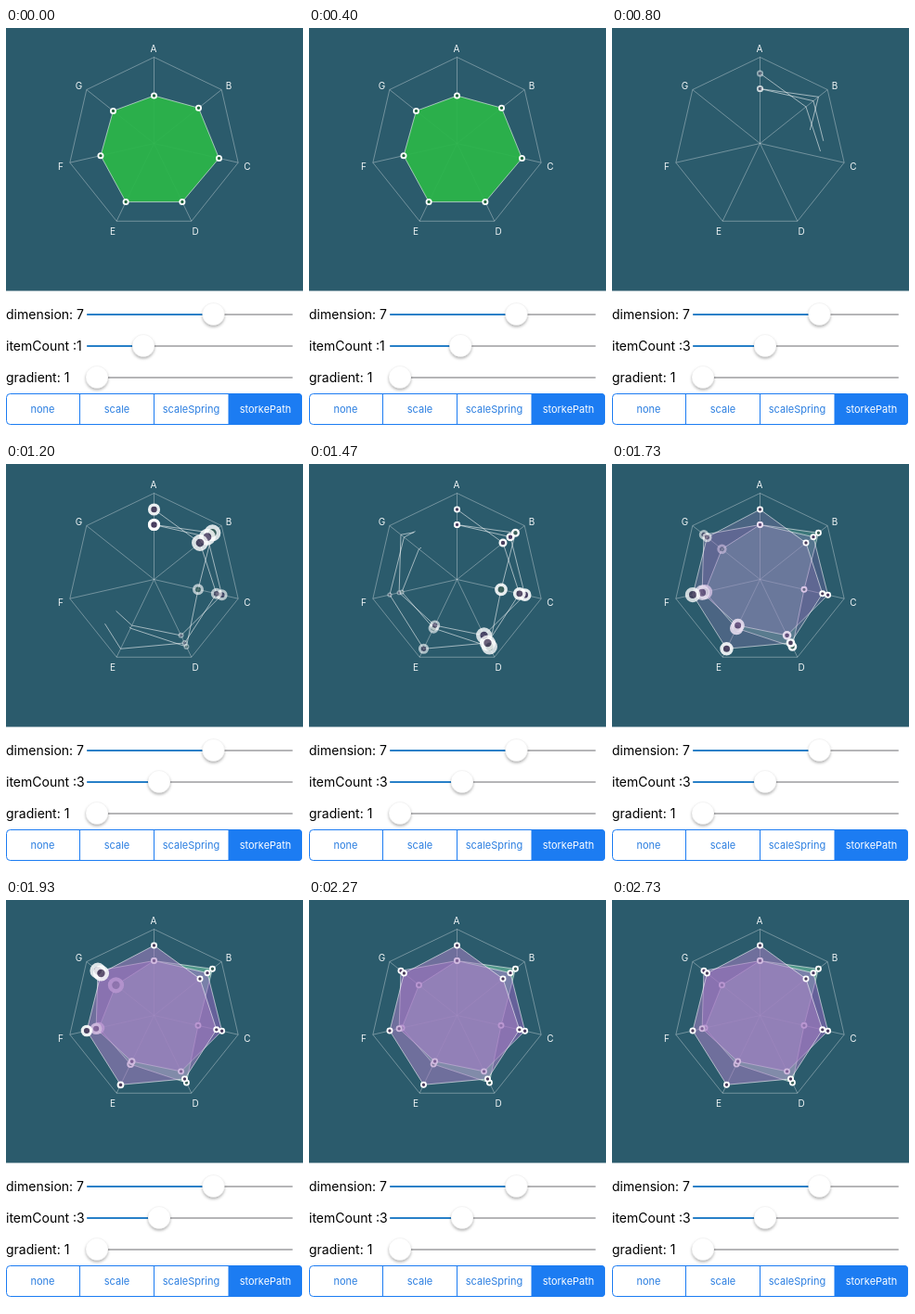
An HTML page that plays this animation: 320x440 px, repeating every 2790 ms.

```html
<!DOCTYPE html>
<html lang="en">
<head>
<meta charset="utf-8">
<title>Radar chart</title>
<style>
  html, body { margin: 0; width: 100%; height: 100%; overflow: hidden; background: #fff; }
  svg { display: block; width: 100vw; height: 100vh; font-family: Inter, Roboto, sans-serif; }
</style>
</head>
<body>
<svg id="stage" viewBox="0 0 320 440">
  <defs>
    <filter id="shadow" x="-50%" y="-50%" width="200%" height="220%">
      <feDropShadow dx="0" dy="2" stdDeviation="1.8" flood-color="#000" flood-opacity=".3"/>
    </filter>
  </defs>
</svg>
<script>
const LOOP = 2790, STEP = LOOP / 42;
const SWITCH = 530;                        // item count goes from 1 to 3
const DRAW_AT = 540, DRAW_MS = 1045;       // outline drawing
const FADE_AT = 1585, FADE_MS = 320;       // fill fading in
const PEAK_AT = 1057, PEAK_GAP = 1000 / 7; // dot pulses, one axis after another
const GROW_MS = 430, SHRINK_MS = 330;
const CX = 159.5, CY = 124.5, R = 93;
const BLUE = '#1c7cf2';
const stage = document.getElementById('stage');

const clamp = v => Math.max(0, Math.min(1, v));

function add(tag, attrs, parent = stage, text) {
  const el = document.createElementNS('http://www.w3.org/2000/svg', tag);
  set(el, attrs);
  if (text) el.textContent = text;
  return parent.appendChild(el);
}

function set(el, attrs) {
  for (const key in attrs) el.setAttribute(key, attrs[key]);
}

function polar(i, r) {
  const a = i * 2 * Math.PI / 7;
  return [CX + r * Math.sin(a), CY - r * Math.cos(a)];
}

const outline = radii => 'M' + radii.map((r, i) => polar(i, r).map(v => v.toFixed(2))).join('L') + 'Z';

function drawWeb() {
  add('rect', { width: 320, height: 283.5, fill: '#2b5b6c' });
  const web = add('g', { fill: 'none', stroke: '#fff', 'stroke-opacity': .42, 'stroke-width': .8 });
  add('path', { d: outline(Array(7).fill(R)) }, web);
  for (let i = 0; i < 7; i++) {
    const [x, y] = polar(i, R);
    add('path', { d: `M${CX} ${CY}L${x} ${y}` }, web);
  }
  const spots = [[159, 26], [240, 65.5], [260, 153], [204, 222.5], [115, 222.5], [59, 153], [78.5, 65.5]];
  spots.forEach(([x, y], i) => add('text',
    { x, y, fill: '#f2f6f7', 'font-size': 10, 'text-anchor': 'middle' }, stage, 'ABCDEFG'[i]));
}

function makeSeries(color, alpha, core, radii) {
  const g = add('g', {});
  const d = outline(radii);
  const fill = add('path', { d, fill: color, 'fill-opacity': alpha }, g);
  const line = add('path', {
    d, fill: 'none', stroke: '#fff', 'stroke-opacity': .7, 'stroke-width': .8,
    pathLength: 1, 'stroke-dasharray': '1 1'
  }, g);
  const dots = radii.map((r, i) => {
    const [cx, cy] = polar(i, r);
    return add('circle', { cx, cy, r: 2.6, fill: core, stroke: '#fff', 'stroke-width': 1.8 }, g);
  });
  return { g, fill, line, dots };
}

function makeSlider(y, label, x) {
  const text = add('text', { x: 0, y: y + 5.3, 'font-size': 14, fill: '#000' }, stage, label);
  add('rect', { x: 87, y: y - 1, width: 222, height: 2, rx: 1, fill: '#b5b5b7' });
  const bar = add('rect', { x: 87, y: y - 1, height: 2, rx: 1, fill: '#2880c8' });
  const knob = add('circle', { cy: y - .5, r: 12, fill: '#fff', stroke: '#000', 'stroke-opacity': .08,
    'stroke-width': .6, filter: 'url(#shadow)' });
  const move = px => { set(bar, { width: px - 87 }); set(knob, { cx: px }); };
  move(x);
  return { text, move };
}

function drawTabs() {
  add('rect', { x: .5, y: 394.5, width: 318, height: 33, rx: 4, fill: '#fff', stroke: BLUE });
  add('path', { d: 'M239.5 394H315a4 4 0 0 1 4 4V424a4 4 0 0 1 -4 4H239.5Z', fill: BLUE });
  add('path', { d: 'M79.5 394V428M159.5 394V428', stroke: BLUE });
  ['none', 'scale', 'scaleSpring', 'storkePath'].forEach((name, i) => add('text', {
    x: 39.5 + i * 80, y: 415, 'font-size': 11, 'text-anchor': 'middle', fill: i === 3 ? '#fff' : '#2b7ee0'
  }, stage, name));
}

drawWeb();
const single = makeSeries('#2bb54a', .94, '#22663f', [51.5, 61.4, 71.8, 70, 70, 59, 56.3]);
const trio = [
  makeSeries('#6ec3a0', .6, '#3b5f58', [59, 80.5, 48.7, 80.5, 58.4, 61, 52.5]),
  makeSeries('#a069c8', .5, '#493a60', [59, 73.5, 75, 67, 55, 64, 77.4]),
  makeSeries('#a880c3', .55, '#4a3d5c', [75.5, 63.3, 69, 76, 83, 74.4, 73])
];
makeSlider(309, 'dimension: 7', 223.5);
const count = makeSlider(343, 'itemCount :1', 148);
makeSlider(377, 'gradient: 1', 98);
drawTabs();

// Each dot grows past its size, then settles back.
function pulse(dot, d) {
  const up = clamp(1 + d / GROW_MS), down = clamp(d / SHRINK_MS);
  const size = 9 * up - 5.5 * down;
  set(dot, {
    r: size * .74, 'stroke-width': size * .51,
    opacity: up < 1 ? .25 + .57 * up : .82 + .18 * down,
    visibility: up > 0 ? 'inherit' : 'hidden'
  });
}

function render(t) {
  const many = t >= SWITCH - 5;
  const slide = clamp(t / 500);
  count.move(148 + 17 * slide * slide * (3 - 2 * slide));
  count.text.textContent = 'itemCount :' + (many ? 3 : 1);
  set(single.g, { visibility: many ? 'hidden' : 'visible' });
  const drawn = clamp((t - DRAW_AT) / DRAW_MS);
  const shown = clamp((t - FADE_AT) / FADE_MS);
  for (const s of trio) {
    set(s.g, { visibility: many ? 'visible' : 'hidden' });
    set(s.fill, { opacity: shown });
    set(s.line, { 'stroke-dashoffset': 1 - drawn, visibility: drawn > 0 ? 'inherit' : 'hidden' });
    s.dots.forEach((dot, i) => pulse(dot, t - PEAK_AT - i * PEAK_GAP));
  }
}

// Advances at fifteen pictures a second.
const start = performance.now();
function tick() {
  const t = (performance.now() - start) % LOOP;
  render(Math.floor(t / STEP + .1) % 42 * 1000 / 15);
  requestAnimationFrame(tick);
}
tick();
</script>
</body>
</html>
```
